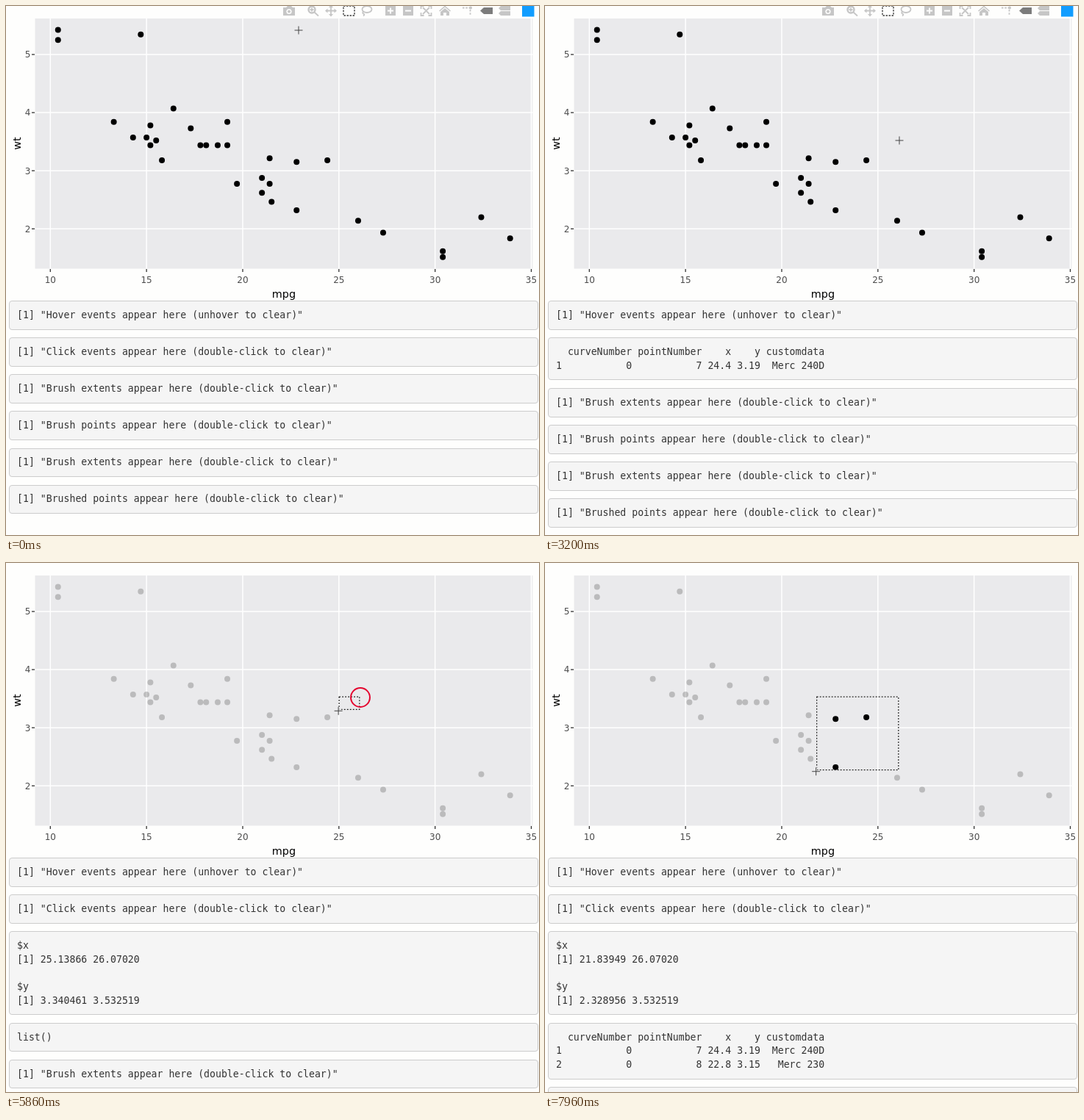
An HTML page that plays this animation: 725 px wide and 720 px high, repeating every 8000 ms.

```html
<!DOCTYPE html>
<html lang="en">
<head>
<meta charset="utf-8">
<title>Linked scatterplot events</title>
<style>
  html, body { margin: 0; width: 100%; height: 100%; overflow: hidden; background: #fefefd; }
  #stage { position: relative; width: 725px; height: 720px; overflow: hidden; }
  svg { position: absolute; left: 0; top: 0; }
  #panels { position: absolute; left: 4px; top: 401.2px; width: 720px; }
  pre {
    box-sizing: border-box; margin: 0 0 10.5px; padding: 9.8px 10px 9.2px;
    border: 1px solid #ccc; border-radius: 4px; background: #f5f5f5; color: #333;
    font: 13.2px/18.6px "DejaVu Sans Mono", "Liberation Mono", monospace;
  }
  .axis { font: 12px "DejaVu Sans", sans-serif; fill: #4d4d4d; }
  .title { font-size: 14.4px; fill: #000; text-anchor: middle; }
  .tip { font: 13.25px "Liberation Sans", Arial, sans-serif; fill: #fff; }
  .icons { fill: #c6c6c6; stroke: none; }
  .icons .line { fill: none; stroke: #c6c6c6; stroke-width: 1.8; }
  .icons .on { fill: #7c7c7c; }
  .icons .hole { fill: #fefefd; }
</style>
</head>
<body>
<div id="stage">
  <svg width="725" height="720">
    <rect x="39.5" y="17" width="677" height="340.5" fill="#eaeaec"/>
    <g id="grid" stroke="#fff" stroke-width="1.5"></g>
    <g id="ticks" stroke="#333" stroke-width="1.3"></g>
    <g id="labels" class="axis">
      <text class="title" x="378" y="397">mpg</text>
      <text class="title" transform="translate(19.5 187) rotate(-90)">wt</text>
    </g>
    <g id="points"></g>

    <g id="modebar" class="icons">
      <path d="M377 2h4l2-2h5l2 2h3v11h-16z"/>
      <circle class="hole" cx="385" cy="7.5" r="3.6"/><circle cx="385" cy="7.5" r="2"/>
      <g class="line">
        <circle cx="416" cy="5" r="4.5" stroke-width="2.4"/>
        <path d="M419.5 8.5l5.5 5M413.5 5h5M416 2.5v5"/>
        <path d="M436 6.5h12M442 .5v12"/>
        <path d="M459 0h15v13h-15z" style="stroke:#6e6e6e" stroke-dasharray="2.5 1.5"/>
        <ellipse cx="491" cy="4.5" rx="6.5" ry="4.5"/>
        <path d="M486 8q-2 2 1 3q1 1-1 2.5"/>
      </g>
      <path d="M434 6.5l3.5-3v6zM450 6.5l-3.5-3v6zM442-1.5l3 3.5h-6zM442 14.5l3-3.5h-6z"/>
      <path d="M516 0h14v13h-14zM540 0h14v13h-14z"/>
      <path class="hole" d="M519 5.5h3v-3h2v3h3v2h-3v3h-2v-3h-3zM543 5.5h8v2h-8z"/>
      <path class="line" d="M564.5 4v-4h4M574.5 0h4v4M578.5 9v4h-4M568.5 13h-4v-4M567 2l9 9M576 2l-9 9"/>
      <path d="M589 6.5l8-7 8 7-1 1-7-6-7 6zM591 8l6-5 6 5v5h-4v-4h-4v4h-4z"/>
      <path class="line" d="M621 2.5h10M631.5 5v7" stroke-dasharray="2.5 1.8"/>
      <circle cx="632" cy="2.5" r="2"/>
      <path class="on" d="M645 6.5l5-4.5h12v9h-12z"/>
      <path d="M670 3l3-3h13v6h-13zM670 10l3-3h13v6h-13z"/>
      <rect x="702" y="-2" width="16.5" height="16.5" fill="#119dff"/>
    </g>

    <g id="tip" class="tip">
      <path d="M440 209l7-6v-21h102v54h-102v-21z" fill="#000"/>
      <text x="449" y="196.5">mpg: 24.4</text>
      <text x="449" y="214">wt: 3.190</text>
      <text x="449" y="231.5">nms: Merc 240D</text>
    </g>
    <g id="brush" fill="none" stroke-width="1.2">
      <rect stroke="#fff" stroke-opacity=".4"/>
      <rect stroke="#222" stroke-dasharray="2 2"/>
    </g>
    <g id="cursor" fill="none">
      <path d="M-5.5 0h11M0-5.5v11" stroke="#eaeaec" stroke-width="3"/>
      <path d="M-5.5 0h11M0-5.5v11" stroke="#444" stroke-width="1"/>
    </g>
    <g id="rings" fill="none" stroke="#e4062f" stroke-width="2"></g>
  </svg>
  <div id="panels"></div>
</div>
<script>
const LOOP = 8000;
const $ = id => document.getElementById(id);
const px = mpg => 60.3 + (mpg - 10) * 26.168;
const py = wt => 66 + (5 - wt) * 79.1;
const between = (t, a, b) => t >= a && t < b;
const clamp = v => Math.max(0, Math.min(1, v));

function set(el, attrs) {
  for (const k in attrs) el.setAttribute(k, attrs[k]);
}
function add(parent, tag, attrs, text = "") {
  const el = document.createElementNS("http://www.w3.org/2000/svg", tag);
  set(el, attrs);
  el.textContent = text;
  parent.append(el);
  return el;
}
function show(el, on) {
  el.style.display = on ? "" : "none";
}
function mix(a, b, f) {
  return a.map((v, i) => v + (b[i] - v) * f);
}

// Axes
for (let v = 10; v <= 35; v += 5) {
  const x = px(v);
  add($("grid"), "path", { d: `M${x} 17V357.5` });
  add($("ticks"), "path", { d: `M${x} 358v4` });
  add($("labels"), "text", { x, y: 377, "text-anchor": "middle" }, v);
}
for (let v = 2; v <= 5; v++) {
  const y = py(v);
  add($("grid"), "path", { d: `M39.5 ${y}H716.5` });
  add($("ticks"), "path", { d: `M35 ${y}h4` });
  add($("labels"), "text", { x: 33.5, y: y + 4.3, "text-anchor": "end" }, v);
}

// Cars that share a weight (row) or a mileage (column), and single ones
const dots = [];
function car(mpg, wt) {
  const x = px(mpg), y = py(wt);
  dots.push({ x, y, el: add($("points"), "circle", { cx: x, cy: y, r: 4 }) });
}
const row = (wt, ...mpgs) => mpgs.forEach(mpg => car(mpg, wt));
const column = (mpg, ...wts) => wts.forEach(wt => car(mpg, wt));

row(3.84, 13.3, 19.2);
row(3.57, 14.3, 15);
row(3.44, 15.2, 17.8, 18.1, 18.7, 19.2);
row(3.18, 15.8, 24.4);
row(2.775, 19.7, 21.4);
column(10.4, 5.25, 5.424);
column(21, 2.62, 2.875);
column(22.8, 2.32, 3.15);
column(30.4, 1.513, 1.615);
car(14.7, 5.345);
car(16.4, 4.07);
car(17.3, 3.73);
car(15.2, 3.78);
car(15.5, 3.52);
car(21.4, 3.215);
car(21.5, 2.465);
car(26, 2.14);
car(27.3, 1.935);
car(32.4, 2.2);
car(33.9, 1.835);

// The brush, in data units: a fixed corner and the reported dragged corner
const anchor = [26.0702, 3.532519];
const drag = [
  { at: 5560, to: anchor },
  { at: 5860, to: [25.13866, 3.340461] },
  { at: 7030, to: [22.69339, 2.853914] },
  { at: 7960, to: [21.83949, 2.328956] },
  { at: 8100, to: [21.8, 2.2] }
];
const brushStart = 5600;
const reportLag = 60;

function corner(t) {
  const n = Math.max(1, drag.findIndex(k => k.at > t));
  const a = drag[n - 1], b = drag[n];
  return mix(a.to, b.to, clamp((t - a.at) / (b.at - a.at)));
}

// Pointer stops and clicks
const rest = [398, 33], onCar = [438.5, 207.5], offCar = [482, 183];
function pointer(t) {
  if (t < 1300) return mix(rest, onCar, clamp((t - 60) / 320));
  return mix(onCar, offCar, clamp((t - 2130) / 520));
}
const ringLife = 1180;
const clicks = [1300, 3560, 3760, 5360].map(at => {
  const [cx, cy] = pointer(at);
  return { at, el: add($("rings"), "circle", { cx, cy }) };
});

// Output panels
const hint = (what, how = "double-click") => `[1] "${what} appear here (${how} to clear)"`;
const lines = [
  "  curveNumber pointNumber    x    y customdata",
  "1           0           7 24.4 3.19  Merc 240D",
  "2           0           8 22.8 3.15   Merc 230"
];
const table = n => lines.slice(0, n + 1).join("\n");

function extents(t) {
  // Refresh every 30 ms
  const [x, y] = corner(t - (t - 5860) % 30);
  return `$x\n[1] ${x.toFixed(5)} 26.07020\n\n$y\n[1] ${y.toFixed(6)} 3.532519`;
}
function brushed(t) {
  if (t < 6350) return "list()";
  return table(t < 7250 ? 1 : 2);
}
const reports = t => t >= 5780;
const panels = [
  t => between(t, 400, 2400) ? table(1) : hint("Hover events", "unhover"),
  t => between(t, 1430, 3930) ? table(1) : hint("Click events"),
  t => reports(t) ? extents(t) : hint("Brush extents"),
  t => reports(t) ? brushed(t) : hint("Brush points"),
  () => hint("Brush extents"),
  () => hint("Brushed points")
].map(text => {
  const el = document.createElement("pre");
  $("panels").append(el);
  return { el, text };
});

function render(t) {
  const brushing = t >= brushStart;
  const [mpg, wt] = corner(t + reportLag);
  const left = px(mpg), bottom = py(wt);
  const right = px(anchor[0]), top = py(anchor[1]);
  const [cx, cy] = brushing ? [left - 1, bottom + 2] : pointer(t);
  set($("cursor"), { transform: `translate(${cx} ${cy})` });

  show($("modebar"), !brushing);
  show($("brush"), brushing);
  for (const r of $("brush").children) {
    set(r, { x: left, y: top, width: right - left, height: bottom - top });
  }
  for (const { x, y, el } of dots) {
    const inside = between(x, left, right) && between(y, top, bottom);
    set(el, { opacity: brushing && !inside ? 0.2 : 1 });
  }

  show($("tip"), between(t, 350, 2300));
  for (const { at, el } of clicks) {
    const age = t - at;
    show(el, between(age, 0, ringLife));
    set(el, {
      r: 6.3 + Math.max(0, age) * 0.0133,
      opacity: clamp((ringLife - age) / 400)
    });
  }

  for (const { el, text } of panels) {
    const s = text(t);
    if (el.textContent !== s) el.textContent = s;
  }
}

const start = performance.now();
function tick() {
  render((performance.now() - start) % LOOP);
  requestAnimationFrame(tick);
}
tick();
</script>
</body>
</html>
```
